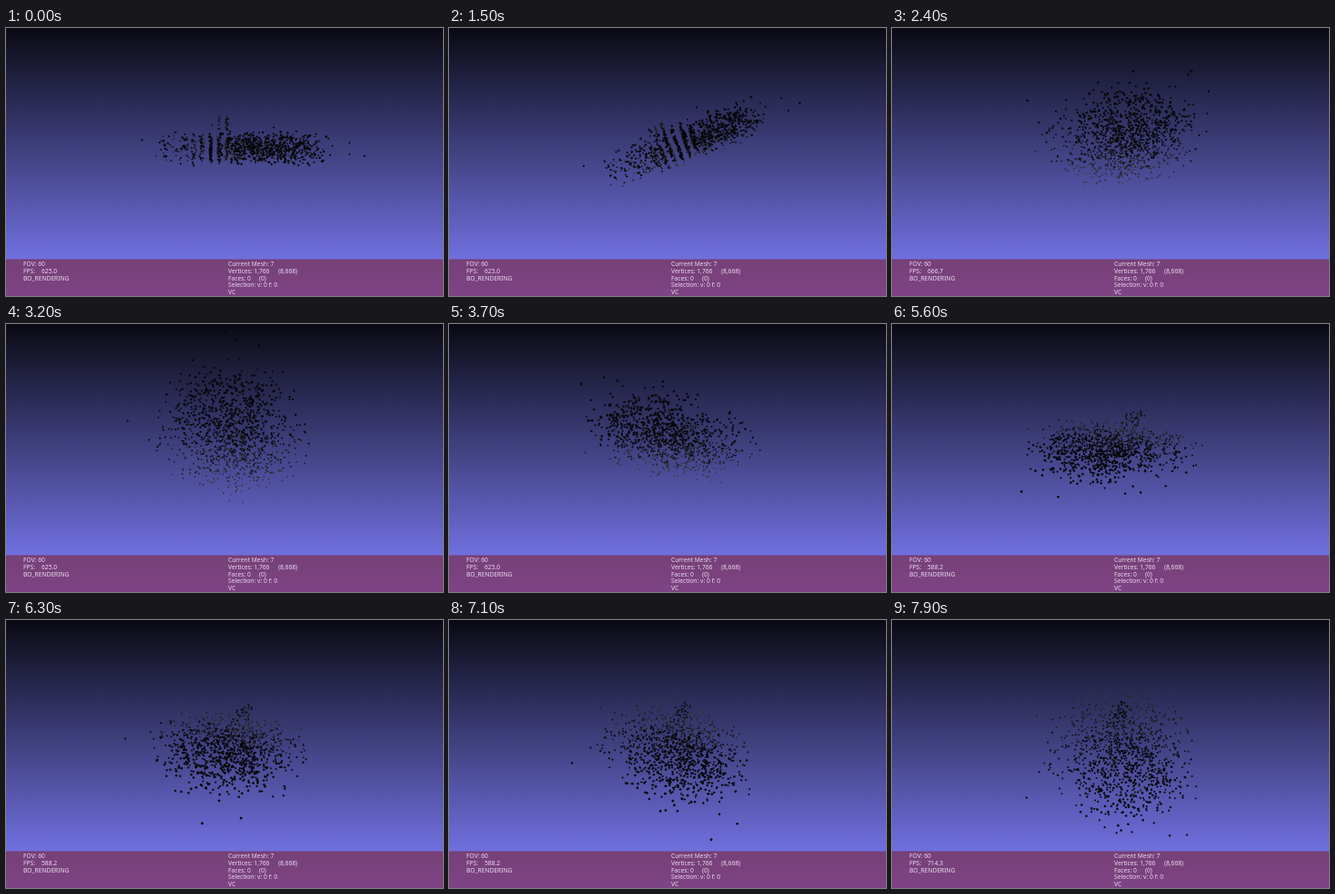
An HTML page with a canvas that plays this animation: 480 px wide and 295 px high, repeating every 8000 ms.

```html
<!DOCTYPE html>
<html lang="en">
<head>
<meta charset="utf-8">
<title>Point cloud viewer</title>
<style>
  html, body { margin: 0; width: 100%; height: 100%; overflow: hidden; background: #0a0a14; }
  #stage { position: relative; width: 480px; height: 295px; overflow: hidden;
    background: linear-gradient(#0a0a14, #8080ff); }
  canvas, svg { position: absolute; left: 0; top: 0; display: block; }
  text { font: 6.7px "Noto Sans", "Open Sans", sans-serif; fill: #eadcf0; white-space: pre; }
</style>
</head>
<body>
<div id="stage">
  <canvas id="cloud" width="480" height="295"></canvas>
  <svg width="480" height="295" viewBox="0 0 480 295">
    <defs>
      <linearGradient id="plum" x2="0" y2="1">
        <stop stop-color="#764077"/><stop offset="1" stop-color="#7e4484"/>
      </linearGradient>
    </defs>
    <rect y="254.5" width="480" height="41" fill="url(#plum)"/>
    <text x="19" y="262.4">FOV: 60</text>
    <text x="19" y="270">FPS:</text>
    <text x="39" y="270" id="fps">625.0</text>
    <text x="19" y="277.6">BO_RENDERING</text>
    <text x="244" y="262.4">Current Mesh: 7</text>
    <text x="244" y="270">Vertices: 1,766</text>
    <text x="299" y="270">(8,668)</text>
    <text x="244" y="277.6">Faces: 0</text>
    <text x="278" y="277.6">(0)</text>
    <text x="244" y="285.2">Selection: v: 0 f: 0</text>
    <text x="244" y="292.8">VC</text>
  </svg>
</div>
<script>
const LOOP = 8000, STEP = 100;
const CX = 252, CY = 132, CAMERA = 320;
const ctx = document.getElementById('cloud').getContext('2d');
const fps = document.getElementById('fps');
const rad = deg => deg * Math.PI / 180;

// Steps during which the view rests
const rests = [27, 28, 29, 46, 65, 66];
const progress = step => step - rests.filter(r => r <= step).length;

// View keys: step, yaw, pitch, roll in degrees
const views = [
  [0, 60, 0, 0], [15, 55, -8, -20], [24, 15, -32, 0], [32, -12, -45, 0],
  [37, -45, -28, 3], [56, -42, 20, 6], [71, 8, 30, 10], [79, 8, 50, 0]
].map(([step, ...angles]) => ({ at: progress(step), angles: angles.map(rad) }));

const rates = [[0, '625.0'], [19, '666.7'], [30, '625.0'], [47, '588.2'], [76, '714.3']];

let seed = 1766;
function rand() {
  seed = (seed + 0x6D2B79F5) | 0;
  let v = Math.imul(seed ^ seed >>> 15, 1 | seed);
  v = v + Math.imul(v ^ v >>> 7, 61 | v) ^ v;
  return ((v ^ v >>> 14) >>> 0) / 4294967296;
}

// Pulls a point towards the nearest scan row, which runs aslant
function toRow(a, b) {
  const c = Math.cos(rad(35)), s = Math.sin(rad(35));
  const across = a * c + b * s;
  const shift = (Math.round(across / 9) * 9 - across) * .7;
  return [a + shift * c, b + shift * s];
}

// A flat disc of points: centre, radii along and across, height, thickness
function disc(count, centre, along, wide, height = 0, thick = 18) {
  return Array.from({ length: count }, () => {
    const angle = rand() * Math.PI * 2;
    const r = Math.sqrt(rand()) * (.75 + .5 * rand());
    const [a, b] = toRow(centre + along * r * Math.cos(angle), wide * r * Math.sin(angle));
    return { a, b, h: height + thick * (rand() + rand() - 1), size: .8 + .3 * rand() };
  });
}

const points = [
  ...disc(540, 8, 84, 70),
  ...disc(350, 46, 42, 44),
  ...disc(230, 0, 38, 38),
  ...disc(70, 15, 108, 98),
  ...disc(30, -15, 11, 11, 28, 10)
];

function viewAt(step) {
  const p = progress(step);
  const i = Math.max(1, views.findIndex(v => v.at >= p));
  const from = views[i - 1], to = views[i];
  const k = (p - from.at) / (to.at - from.at);
  return from.angles.map((v, j) => v + (to.angles[j] - v) * k);
}

function projector([yaw, pitch, roll]) {
  const [sy, sp, sr] = [yaw, pitch, roll].map(Math.sin);
  const [cy, cp, cr] = [yaw, pitch, roll].map(Math.cos);
  return ({ a, b, h, size }) => {
    const x = a * sy + b * cy;
    const z = a * cy - b * sy;
    const y = z * sp - h * cp;
    const depth = z * cp + h * sp;
    const zoom = CAMERA / (CAMERA - depth);
    return {
      x: CX + (x * cr - y * sr) * zoom,
      y: CY + (x * sr + y * cr) * zoom,
      r: size * zoom,
      depth
    };
  };
}

function draw(step) {
  ctx.clearRect(0, 0, 480, 295);
  const dots = points.map(projector(viewAt(step))).sort((p, q) => p.depth - q.depth);
  for (const { x, y, r, depth } of dots) {
    const far = Math.min(1, Math.max(0, (10 - depth) / 70));
    const c = Math.round(7 + 53 * far);
    ctx.fillStyle = `rgb(${c},${c},${c + 3})`;
    ctx.beginPath();
    ctx.arc(x, y, r, 0, Math.PI * 2);
    ctx.fill();
  }
  fps.textContent = rates.filter(r => r[0] <= step).pop()[1];
}

let shown = -1;
const start = performance.now();
function tick() {
  const step = Math.floor((performance.now() - start) % LOOP / STEP);
  if (step !== shown) draw(shown = step);
  requestAnimationFrame(tick);
}
tick();
</script>
</body>
</html>
```
